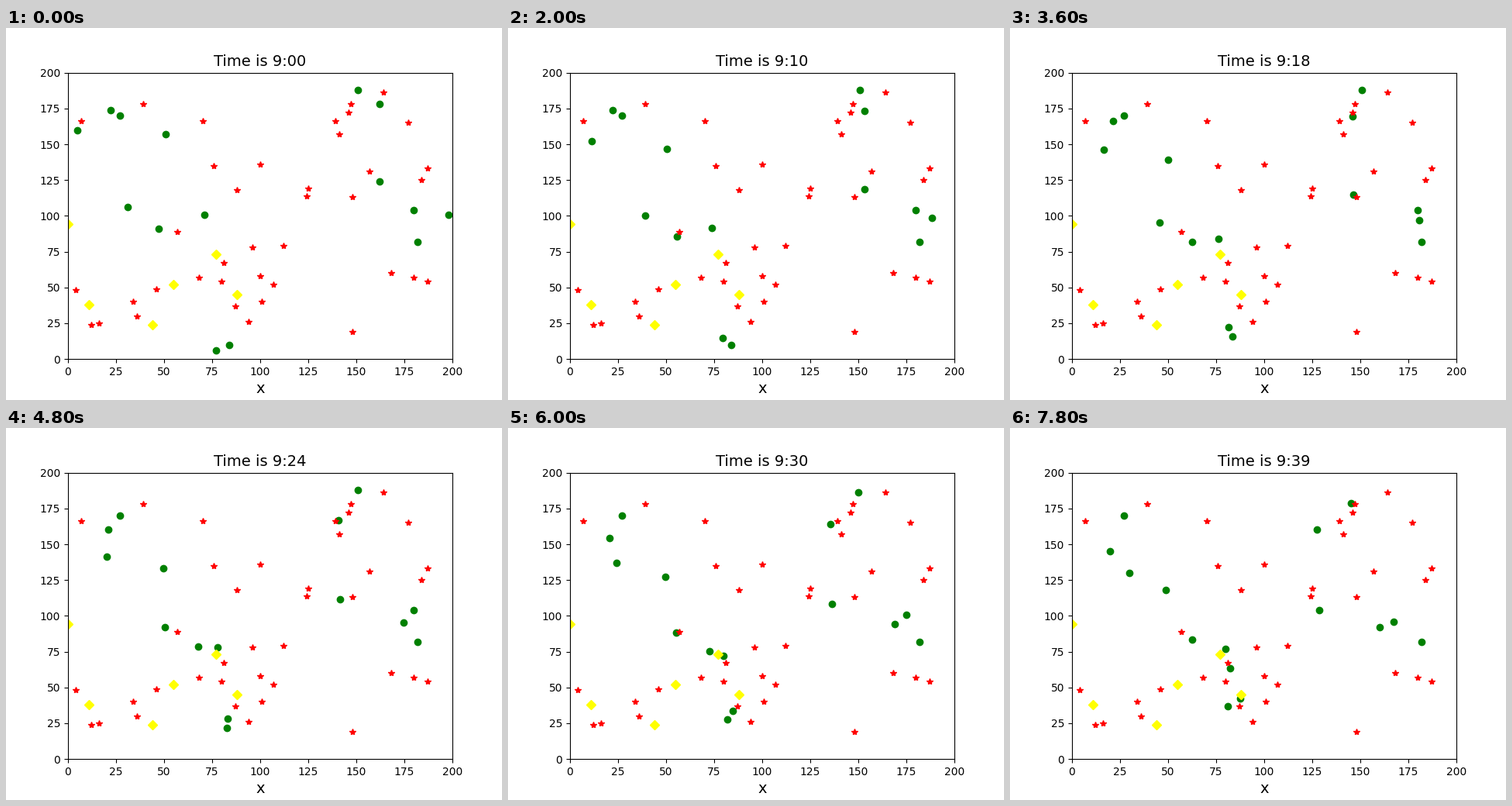
Write a matplotlib script that moves like this. It is 640x480 px and loops after 8 s.

```python
import math
import matplotlib.pyplot as plt
from matplotlib.animation import FuncAnimation

MINUTES = 40
NEVER = MINUTES

HUBS = [(0, 94), (77, 73), (55, 52), (88, 45), (11, 38), (44, 24)]
WEST, MID, _, EAST, LOW, SOUTH = HUBS

STARS = [
    (7, 166), (39, 178), (70, 166), (76, 135), (88, 118), (100, 136),
    (125, 119), (124, 114), (147, 178), (146, 172), (139, 166), (141, 157),
    (164, 186), (177, 165), (157, 131), (148, 113), (187, 133), (184, 125),
    (57, 89), (96, 78), (112, 79), (81, 67), (68, 57), (80, 54),
    (100, 58), (107, 52), (101, 40), (87, 37), (94, 26), (4, 48),
    (12, 24), (16, 25), (34, 40), (36, 30), (46, 49), (168, 60),
    (180, 57), (187, 54), (148, 19),
]

# (home, departure minute, stops in order)
WALKERS = [
    ((5, 160), 0, [MID]),
    ((22, 174), 10, [LOW]),
    ((27, 170), NEVER, [MID]),
    ((51, 157), 0, [SOUTH]),
    ((71, 101), 0, [EAST]),
    ((31, 106), 0, [MID]),
    ((47, 91), 0, [MID, (125, 119)]),
    ((77, 6), 1, [EAST]),
    ((84, 10), 12, [MID]),
    ((151, 188), 28, [MID]),
    ((162, 178), 0, [WEST]),
    ((162, 124), 0, [MID]),
    ((198, 101), 0, [MID]),
    ((180, 104), 24, [EAST]),
    ((182, 82), NEVER, [MID]),
]


def position(walker, minute):
    """Walk one unit per minute, heading for the next stop once within a unit."""
    (x, y), start, stops = walker
    left = max(0, minute - start)
    for tx, ty in stops:
        dist = math.hypot(tx - x, ty - y)
        steps = min(left, int(dist))
        x += (tx - x) * steps / dist
        y += (ty - y) * steps / dist
        left -= steps
    return x, y


fig, ax = plt.subplots(figsize=(6.4, 4.8), dpi=100)
ax.set_xlim(0, 200)
ax.set_ylim(0, 200)
ax.set_xlabel("x", fontsize=14)
title = ax.set_title("Time is 9:00", fontsize=14)

walkers, = ax.plot([], [], "o", color="green")
ax.plot(*zip(*STARS), "*", color="red")
ax.plot(*zip(*HUBS), "D", color="yellow")


def update(minute):
    walkers.set_data(*zip(*(position(w, minute) for w in WALKERS)))
    title.set_text(f"Time is 9:{minute:02d}")
    return walkers, title


anim = FuncAnimation(fig, update, frames=MINUTES, interval=200,
                     repeat=True, repeat_delay=0, blit=False)
plt.show()
```
